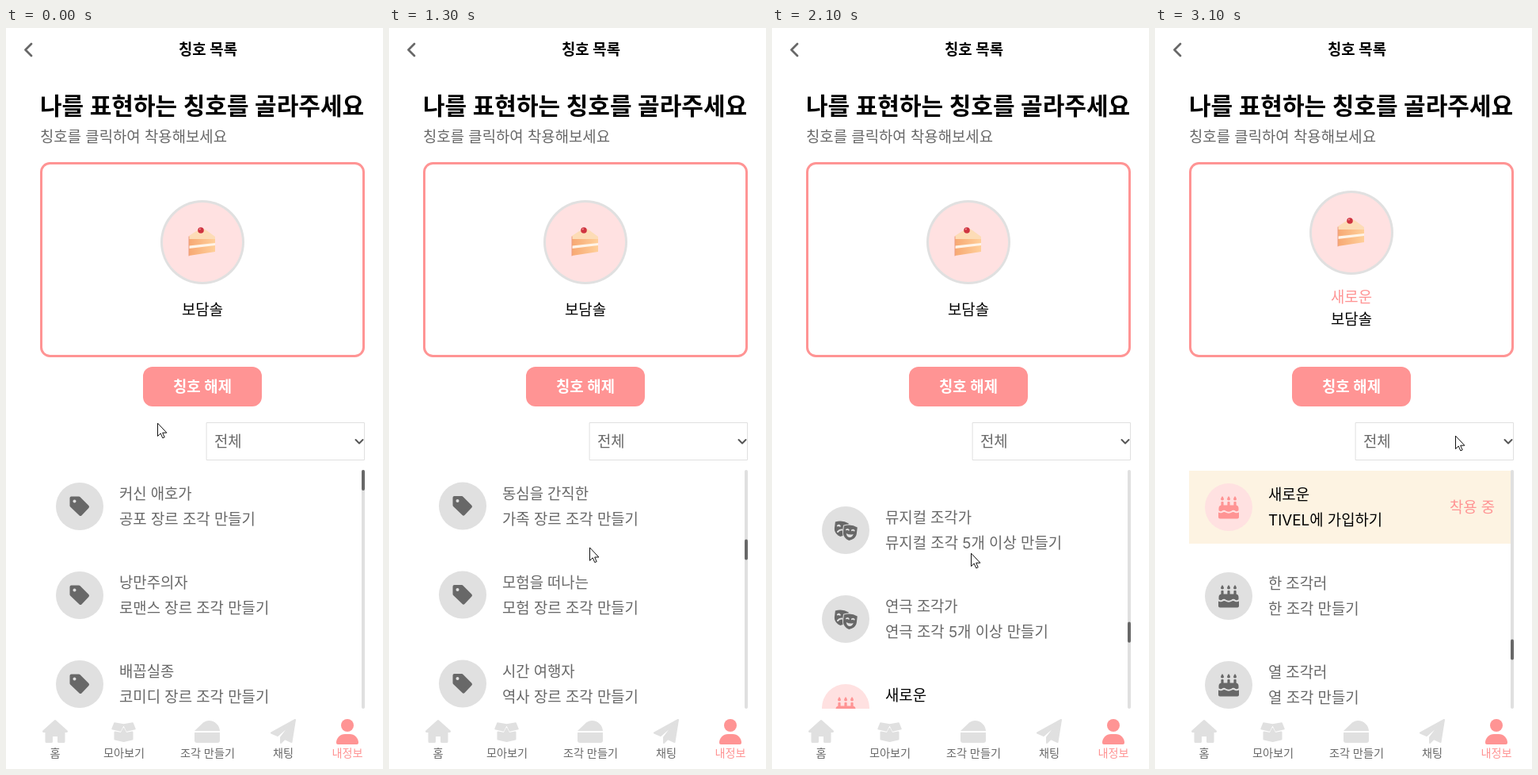
An HTML page with a canvas for the animation above (3200 ms loop, 476 by 934 pixels).

```html
<!DOCTYPE html>
<html lang="ko">
<head>
<meta charset="utf-8">
<title>칭호 목록</title>
<style>
html, body { margin: 0; width: 100%; height: 100%; overflow: hidden; background: #fff; }
canvas { display: block; width: 476px; height: 934px; }
</style>
</head>
<body>
<canvas id="stage" width="476" height="934"></canvas>
<script>
const ctx = document.getElementById('stage').getContext('2d');
const FONT = 'Inter, "Noto Sans CJK KR", "Noto Sans CJK", "Noto Sans KR", sans-serif';
const PINK = '#ff9494', PALE = '#ffe1e1', GRAY = '#e0e0e0', DARK = '#686868';
const BODY = 18.85;
const LOOP = 3200, STEP = 100;
const PITCH = 112, LIST_TOP = 557, LIST_H = 301, ROWS = 31;
const OPEN = 2600, CLOSE = 3000;
const NICK = '보담솔';

const titles = [
  ['커신 애호가', '공포 장르 조각 만들기'],
  ['낭만주의자', '로맨스 장르 조각 만들기'],
  ['배꼽실종', '코미디 장르 조각 만들기'],
  ['심장이 뛰는', '액션 장르 조각 만들기'],
  ['추리하는', '스릴러 장르 조각 만들기'],
  ['사건의 목격자', '범죄 장르 조각 만들기'],
  ['상상할 수 없는', '판타지/SF 장르 조각 만들기'],
  ['일상이 드라마', '드라마 장르 조각 만들기'],
  ['흥이 넘치는', '뮤지컬 장르 조각 만들기'],
  ['동심을 간직한', '가족 장르 조각 만들기'],
  ['모험을 떠나는', '모험 장르 조각 만들기'],
  ['시간 여행자', '역사 장르 조각 만들기'],
  ['현실을 담는', '다큐 장르 조각 만들기'],
  ['그림 속 주인공', '애니 장르 조각 만들기'],
  ['영화 조각가', '영화 조각 5개 이상 만들기'],
  ['일찍 일어나는 새', '조조 영화 관람하기'],
  ['잠들지 않는 올빼미', '심야 영화 관람하기'],
  ['주말의 관객', '주말 영화 관람하기'],
  ['혼자만의 시간', '혼자 영화 관람하기'],
  ['다시 보는', '같은 영화 관람하기'],
  ['뮤지컬 조각가', '뮤지컬 조각 5개 이상 만들기'],
  ['연극 조각가', '연극 조각 5개 이상 만들기'],
  ['새로운', 'TIVEL에 가입하기'],
  ['한 조각러', '한 조각 만들기'],
  ['열 조각러', '열 조각 만들기'],
  ['백 조각러', '백 조각 만들기']
];
const OWNED = 22;

// Keys: time, then one or more values
const scrollKeys = [[700, 0], [800, 60], [1100, 630], [1600, 1576], [2100, 2210], [2250, 2370], [2400, 2463]];
const cursorKeys = [[600, 191, 498], [900, 246, 640], [1100, 249, 648], [1600, 259, 665], [2100, 251, 662],
  [2500, 228, 626], [2600, 228, 626], [2800, 362, 524], [2900, 379, 516], [3000, 379, 514]];

function track(keys, t) {
  if (t <= keys[0][0]) return keys[0].slice(1);
  for (let i = 1; i < keys.length; i++) {
    const [a, b] = [keys[i - 1], keys[i]];
    if (t <= b[0]) {
      const k = (t - a[0]) / (b[0] - a[0]);
      return b.slice(1).map((v, j) => a[j + 1] + (v - a[j + 1]) * k);
    }
  }
  return keys[keys.length - 1].slice(1);
}

// Text is placed by the vertical middle of its letters
function text(str, x, cy, size, color, weight = 400, align = 'left') {
  ctx.font = `${weight} ${size}px ${FONT}`;
  ctx.textAlign = align;
  ctx.fillStyle = color;
  ctx.fillText(str, x, cy + size * 0.37);
}

function box(x, y, w, h, r, fill) {
  ctx.beginPath();
  ctx.roundRect(x, y, w, h, r);
  ctx.fillStyle = fill;
  ctx.fill();
}

function disc(x, y, r, fill) {
  ctx.beginPath();
  ctx.arc(x, y, r, 0, Math.PI * 2);
  ctx.fillStyle = fill;
  ctx.fill();
}

function shape(d, fill, stroke, width = 1) {
  const p = new Path2D(d);
  ctx.lineJoin = ctx.lineCap = 'round';
  if (fill) { ctx.fillStyle = fill; ctx.fill(p); }
  if (stroke) { ctx.strokeStyle = stroke; ctx.lineWidth = width; ctx.stroke(p); }
}

function at(x, y, draw) {
  ctx.save();
  ctx.translate(x, y);
  draw();
  ctx.restore();
}

function tagIcon(c, bg) {
  shape('M-10.5 -10.5H-1L10 .5L1 10L-10.5 -1Z', c, c, 4);
  disc(-6.5, -6.5, 2, bg);
}

function filmIcon(c, bg) {
  box(-14, -12, 28, 24, 4, c);
  for (const y of [-9, 1.5]) box(-6.5, y, 13, 7.5, 1, bg);
  for (const x of [-11.5, 8.5]) for (const y of [-8.5, -1.5, 5.5]) box(x, y, 3, 3.2, 0.8, bg);
}

function maskIcon(c, bg) {
  const mask = 'M-8.5 -7Q0 -11 8.5 -7V1C8.5 6 4 9.5 0 10.5C-4 9.5 -8.5 6 -8.5 1Z';
  at(-5.5, -2.5, () => {
    ctx.rotate(0.12);
    shape(mask, c);
    shape('M-5 -2.5Q-3.5 -4 -2 -2.5M-4 5Q-2 2 1 2', null, bg, 2);
  });
  at(5.5, 2.5, () => {
    ctx.rotate(0.12);
    shape(mask, c, bg, 2);
    shape(mask, c);
    shape('M-5 -2.5Q-3.5 -4 -2 -2.5M2 -2.5Q3.5 -4 5 -2.5', null, bg, 1.7);
    shape('M-4.5 2Q0 4 4.5 2Q3.5 6.5 0 6.5Q-3.5 6.5 -4.5 2Z', bg);
  });
}

function cakeIcon(c, bg) {
  for (const x of [-8, 0, 8]) {
    shape(`M${x} -14Q${x + 4} -9 ${x} -8.5Q${x - 4} -9 ${x} -14Z`, c);
    box(x - 1.6, -7, 3.2, 6, 1, c);
  }
  box(-12.5, -2.5, 25, 10, [4, 4, 0, 0], c);
  box(-13, 4, 26, 10.5, [0, 0, 2, 2], c);
  shape('M-13 5Q-11 7 -8.5 6Q-6 4 -4 5.5Q0 8 4 5.5Q6 4 8.5 6Q11 7 13 5', null, bg, 2);
}

function row(i, y, worn) {
  const own = i === OWNED;
  const bg = own ? PALE : GRAY, fg = own ? PINK : DARK;
  if (worn && own) box(43, y - 46, 406, 92, 0, '#fdf3e2');
  disc(93, y, 30, bg);
  const icon = i < 14 ? tagIcon : i < 20 ? filmIcon : i < 22 ? maskIcon : cakeIcon;
  at(93, y, () => icon(fg, bg));
  const color = own ? '#000' : DARK;
  text(titles[i][0], 143, y - 16, BODY, color, 500);
  text(titles[i][1], 143, y + 16, BODY, color);
  if (worn && own) text('착용 중', 372, y, BODY, PINK, 500);
}

function list(scroll, worn) {
  ctx.save();
  ctx.beginPath();
  ctx.rect(0, LIST_TOP, 476, LIST_H);
  ctx.clip();
  titles.forEach((_, i) => {
    const y = 603 + PITCH * i - scroll;
    if (y > LIST_TOP - 50 && y < LIST_TOP + LIST_H + 50) row(i, y, worn);
  });
  const ratio = LIST_H / (PITCH * ROWS);
  box(449, LIST_TOP, 4, LIST_H, 2, GRAY);
  box(449, LIST_TOP + scroll * ratio, 4, LIST_H * ratio, 2, DARK);
  ctx.restore();
}

function sliceOfCake() {
  const g = ctx.createLinearGradient(-17, 0, 17, 0);
  g.addColorStop(0, '#f7a873');
  g.addColorStop(1, '#ffd09a');
  shape('M-17 -6L16 -5V13L-17 18Z', g);
  shape('M-17 5.5L16 2V5L-17 9Z', '#fff4e8');
  shape('M-17 -7L-3 -16Q1 -17 5 -14L16 -6V-3L-17 -3Z', '#fddcb6');
  shape('M-17 -6V18', null, '#ec9c80', 1);
  disc(-2, -14, 3.8, '#cf3340');
  disc(-3.2, -15.4, 1, '#f29a98');
}

function card(worn) {
  const y = worn ? 258 : 270;
  ctx.beginPath();
  ctx.roundRect(44.5, 170.5, 407, 243, 11);
  ctx.strokeStyle = PINK;
  ctx.lineWidth = 3;
  ctx.stroke();
  disc(248, y, 53, GRAY);
  disc(248, y, 50, PALE);
  at(248, y - 1, sliceOfCake);
  if (worn) text('새로운', 248, 339, BODY, PINK, 500, 'center');
  text(NICK, 248, worn ? 367 : 355, BODY, '#000', 500, 'center');
}

function nav() {
  shape('M62 873.5L76.5 886.5H73V899.5H66.5V891.5H57.5V899.5H51V886.5H47.5Z', GRAY, GRAY, 3);
  shape('M137 876L148.5 878L144.5 886L134 883.5ZM160 876L148.5 878L152.5 886L163 883.5Z', GRAY, GRAY, 1.5);
  shape('M137.5 887.5L145.5 889L148.5 883L151.5 889L159.5 887.5V896.5L148.5 899L137.5 896.5Z', GRAY, GRAY, 2);
  shape('M238 886L249 875.5Q252 873 256 873C264 873 269.5 879 270 886Z', GRAY);
  box(238, 888, 32, 13, [0, 0, 3, 3], GRAY);
  shape('M365 872L335 888.5L343 892L360 877L347 894V901L352 896L360.5 900Z', GRAY, GRAY, 2);
  disc(431, 879, 8, PINK);
  box(417, 890, 28, 13, [11, 11, 2, 2], PINK);
  [['홈', 62], ['모아보기', 149], ['조각 만들기', 254.5], ['채팅', 350], ['내정보', 431]].forEach(([s, x], i) =>
    text(s, x, 913.5, 14.2, i === 4 ? PINK : DARK, 500, 'center'));
}

function page(scroll, worn) {
  ctx.fillStyle = '#fff';
  ctx.fillRect(0, 0, 476, 934);
  shape('M32 20L24.5 27.5L32 35', null, DARK, 2.8);
  text('칭호 목록', 255, 27, BODY, '#000', 600, 'center');
  text('나를 표현하는 칭호를 골라주세요', 43, 98, 30, '#000', 600);
  text('칭호를 클릭하여 착용해보세요', 43, 137, BODY, DARK);
  card(worn);
  box(173, 427, 150, 50, 12, PINK);
  text('칭호 해제', 248, 452, BODY, '#fff', 600, 'center');
  ctx.strokeStyle = GRAY;
  ctx.lineWidth = 1;
  ctx.strokeRect(253.5, 497.5, 199, 47);
  text('전체', 263, 521, BODY, DARK, 500);
  shape('M441.5 519L446 523.5L450.5 519', null, '#555', 2);
  list(scroll, worn);
  nav();
}

function dialog() {
  ctx.fillStyle = 'rgba(98, 98, 98, 0.75)';
  ctx.fillRect(0, 0, 476, 934);
  box(56, 376, 384, 180, 20, '#fff');
  text('칭호를 착용했어요!', 88, 433, 26.4, '#000', 500);
  text('확인', 383.5, 503, BODY, PINK, 600, 'center');
}

function cursor(x, y, hand) {
  at(x, y, () => hand
    ? shape('M-1.5 2Q0 -1 2 2V8Q4 6.5 5 8.5Q7 7.5 8 9.5Q10 9 10 11.5V16Q10 19 8 22H-1Q-4 17 -7 13Q-7 10 -4 11.5L-1.5 14Z', '#fff', '#111', 1.1)
    : shape('M.5 .5V16.5L4.2 13L6.8 18.8L9.2 17.8L6.7 12.2H11.5Z', '#fff', '#111', 1));
}

function draw(now) {
  const time = now % LOOP;
  const t = time - time % STEP;
  page(track(scrollKeys, t)[0], t >= OPEN);
  if (t >= OPEN && t < CLOSE) dialog();
  cursor(...track(cursorKeys, t), t >= 2400 && t < OPEN);
}

const start = performance.now();
function tick() {
  draw(performance.now() - start);
  requestAnimationFrame(tick);
}
tick();
</script>
</body>
</html>
```
